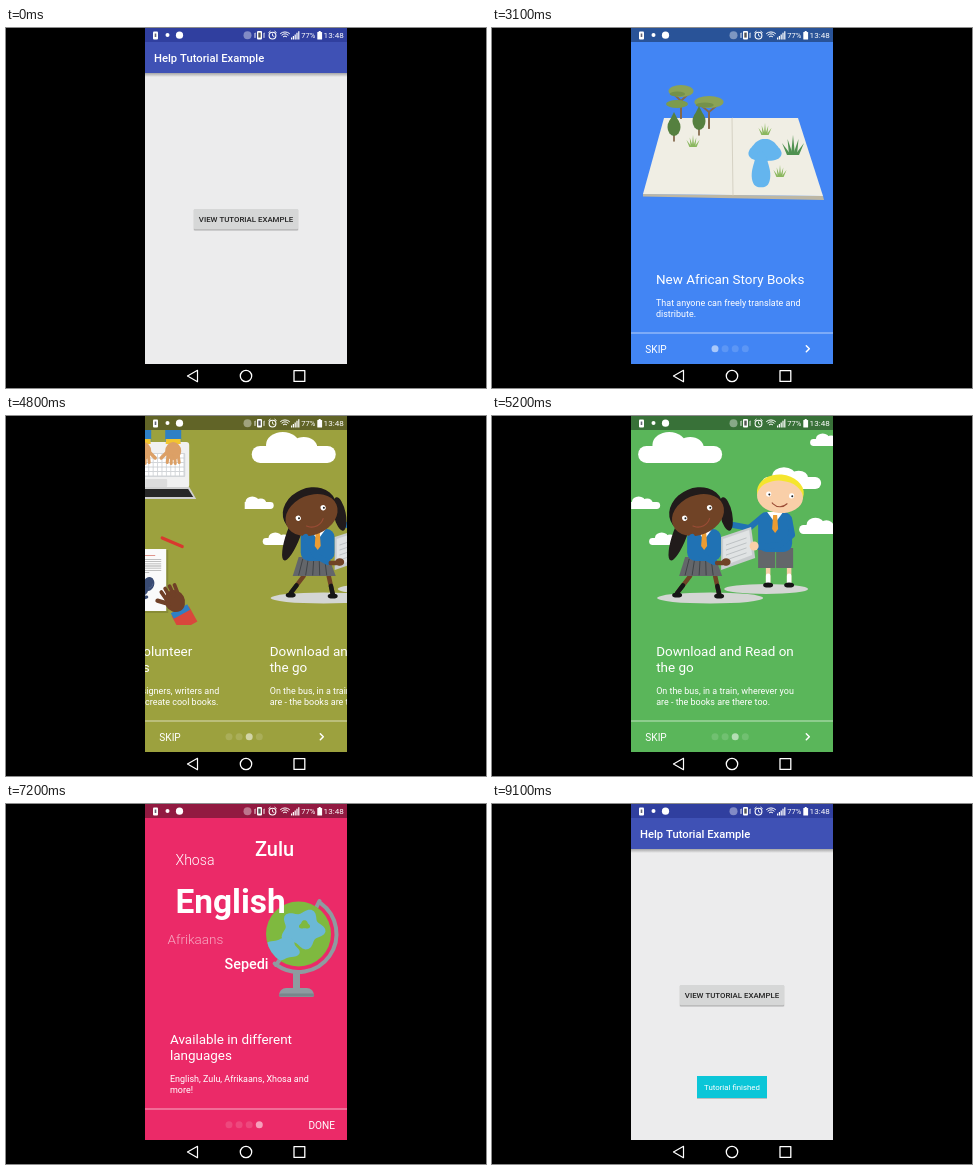
These frames come from a looping animation (480 by 360 pixels, 9.6 s). An HTML page with a canvas:

```html
<!DOCTYPE html>
<html lang="en">
<head>
<meta charset="utf-8">
<title>Help Tutorial Example</title>
<style>
html, body { margin: 0; width: 100%; height: 100%; overflow: hidden; background: #000; }
canvas { display: block; width: 480px; height: 360px; }
</style>
</head>
<body>
<canvas id="stage"></canvas>
<script>
const LOOP = 9600, STEP = 100;
const LEFT = 139, WIDTH = 202, BOTTOM = 336, RISE = 27, BAR = 14;
const OPEN = 2286, CLOSE = 7500, TOAST = 7800;
const SWIPES = [{ at: 3450, span: 590 }, { at: 4560, span: 680 }, { at: 5800, span: 860 }];

const scale = window.devicePixelRatio || 1;
const makeContext = canvas => {
  canvas.width = 480 * scale;
  canvas.height = 360 * scale;
  const c = canvas.getContext('2d');
  c.scale(scale, scale);
  return c;
};
const stage = makeContext(document.getElementById('stage'));
const layer = makeContext(document.createElement('canvas'));
let g = stage;

const clamp = v => Math.max(0, Math.min(1, v));
const mix = (a, b, k) => a + (b - a) * k;
const white = a => `rgba(255,255,255,${a})`;
const black = a => `rgba(0,0,0,${a})`;
const times = (n, fn) => { for (let i = 0; i < n; i++) fn(i); };

// Drawing helpers
function rect(color, x, y, w, h, r = 0) {
  g.fillStyle = color;
  g.beginPath();
  g.roundRect(x, y, w, h, r);
  g.fill();
}
function ell(color, x, y, rx, ry = rx, turn = 0) {
  g.fillStyle = color;
  g.beginPath();
  g.ellipse(x, y, rx, ry, turn, 0, Math.PI * 2);
  g.fill();
}
function trace(pts) {
  g.beginPath();
  for (let i = 0; i < pts.length; i += 2) g.lineTo(pts[i], pts[i + 1]);
}
function poly(color, ...pts) {
  trace(pts);
  g.fillStyle = color;
  g.fill();
}
function pen(color, w) {
  g.strokeStyle = color;
  g.lineWidth = w;
  g.lineCap = g.lineJoin = 'round';
  g.stroke();
}
function line(color, w, ...pts) {
  trace(pts);
  pen(color, w);
}
function arc(color, w, x, y, r, from = 0, to = Math.PI * 2) {
  g.beginPath();
  g.arc(x, y, r, from, to);
  pen(color, w);
}
// Ellipse with a wavy outline
function wobble(color, x, y, rx, ry, waves, amp, phase = 0) {
  const pts = [];
  times(48, i => {
    const a = i * Math.PI / 24, r = 1 + amp * Math.sin(waves * a + phase);
    pts.push(x + rx * r * Math.cos(a), y + ry * r * Math.sin(a));
  });
  poly(color, ...pts);
}
function text(str, x, y, size, weight = 400, color = '#fff', align = 'left') {
  g.font = `${weight} ${size}px Roboto, sans-serif`;
  g.textAlign = align;
  g.fillStyle = color;
  g.fillText(str, x, y);
}
function clipped(x, y, w, h, draw) {
  g.save();
  g.beginPath();
  g.rect(x, y, w, h);
  g.clip();
  draw();
  g.restore();
}
function placed(x, y, turn, sx, sy, draw) {
  g.save();
  g.translate(x, y);
  g.rotate(turn);
  g.scale(sx, sy);
  draw();
  g.restore();
}

// System bars
function statusIcons() {
  const w = '#fff';
  rect(w, 147, 3.5, 5, 8, 1);
  rect('#667', 148.7, 5.5, 1.6, 3.5);
  ell(w, 161.5, 7, 2);
  ell(w, 173.5, 7.2, 3.6);
  ell(white(.4), 241.5, 7.2, 4);
  rect(w, 251, 3, 5, 8.5, 1);
  rect('#555', 252.3, 4.6, 2.4, 5);
  for (const x of [249, 258]) line(w, .9, x, 5, x, 9.5);
  arc(w, 1.1, 266.5, 7.6, 3.4);
  line(w, .9, 266.5, 5.8, 266.5, 7.7, 268, 8.4);
  for (const d of [-1, 1]) line(w, 1, 266.5 + d * 3.8, 4.6, 266.5 + d * 2.3, 3.3);
  times(3, i => arc(w, 1, 279, 10.5, 2.5 + i * 2.1, -2.3, -.84));
  times(5, i => rect(w, 285 + i * 1.8, 9.6 - i * 1.6, 1.2, 1.8 + i * 1.6));
  text('77%', 295.3, 10.2, 7.6);
  rect(w, 311.3, 4, 4.8, 7.5, .6);
  rect(w, 312.7, 3, 2, 1.2);
  text('13:48', 317.6, 10.4, 8.1);
}
function navIcons() {
  line('#fff', 1.2, 181.5, 348, 191.5, 342.3, 191.5, 353.7, 181.5, 348);
  arc('#fff', 1.3, 240, 348, 5.7);
  g.strokeRect(288, 342.6, 10.8, 10.8);
}

function mainScreen(t) {
  rect('#ececed', LEFT, 0, WIDTH, BOTTOM);
  const shade = g.createLinearGradient(0, 45, 0, 49);
  shade.addColorStop(0, black(.3));
  shade.addColorStop(1, black(0));
  rect(shade, LEFT, 45, WIDTH, 4);
  rect('#3f51b5', LEFT, BAR, WIDTH, 31);
  rect('#303f9f', LEFT, 0, WIDTH, BAR);
  text('Help Tutorial Example', 148, 34, 11.22, 500);

  rect(black(.1), 187.5, 181, 105, 22, 1.5);
  rect(black(.16), 188, 182, 104, 20.3, 1);
  rect('#d6d7d7', 188, 181, 104, 20.3, 1);
  if (t >= 1400 && t < 2200) {
    const fade = .12 * clamp((2200 - t) / 400);
    clipped(188, 181, 104, 20.3, () => ell(black(fade), 240, 191, 60 * clamp((t - 1300) / 500)));
  }
  text('VIEW TUTORIAL EXAMPLE', 240, 194.2, 7.85, 500, '#212121', 'center');
}

// Story book landscape
function grass(x, y, s, color) {
  for (let i = -2; i <= 2; i++) {
    const root = x + i * s * .2;
    poly(color, root - s * .2, y, x + i * s * .55, y - s * (2 - Math.abs(i) * .4), root + s * .2, y);
  }
}
function acacia(x, y, w, base) {
  for (const d of [-1, 1]) line('#86694a', 1.8, x, base, x, y + 10, x + d * w * .3, y + 3);
  ell('#8aa356', x, y, w * .52, 6);
  ell('#74914a', x - w * .15, y + 3, w * .32, 2.5);
}
function bush(x, y) {
  line('#7a5c3e', 1.6, x, y + 16, x, y);
  ell('#55803f', x, y + 2, 6.5, 9);
  poly('#55803f', x - 5, y - 3, x, y - 13, x + 5, y - 3);
}
function drawMap() {
  poly('#bdb7a4', 151, 166, 331, 168, 332, 172, 151, 168.5);
  poly('#f0eee4', 172, 90, 306, 90, 331, 168, 151, 166);
  line('#d6d2c4', 1, 240, 90, 241, 167);
  wobble('#64b5ee', 273, 123, 16, 11, 3, .1);
  wobble('#64b5ee', 269, 143, 9, 18, 3, .1);
  acacia(217, 74, 28, 100);
  acacia(189, 63, 24, 90);
  ell('#7c9b4e', 185, 76, 11, 4);
  bush(182, 97);
  bush(207, 91);
  for (const [x, y] of [[201, 119], [273, 107], [288, 149]]) grass(x, y, 6, '#8ab75e');
  grass(301, 127, 10, '#4f9150');
}

// Desk seen from above
function cup(x, y) {
  ell('#fff', x, y, 9);
  ell('#ddd', x, y, 7.2);
  line('#fff', 2.4, x - 5, y + 1, x - 10, y);
  ell('#fff', x, y, 6.8);
  ell('#5a3522', x, y, 5.4);
}
// Fingers point up, thumb on the side of dir
function hand(x, y, turn, size, dir, skin, sleeve, cuff) {
  placed(x, y, turn, size * dir, size, () => {
    rect(sleeve, -8, 10, 16, 14);
    rect(cuff, -7.5, 8, 15, 5);
    ell(skin, 0, 1, 8, 9);
    times(4, i => line(skin, 3, i * 3.4 - 5, -3, i * 4 - 6, Math.abs(i - 1.5) - 12));
    line(skin, 3.4, 5, 1, 12, -6);
  });
}
function laptop() {
  rect('#f1f1f1', 226, 26, 67, 46, 3);
  rect('#d2d5d8', 230, 37, 59, 24, 1);
  times(65, i => rect('#fff', 231 + i % 13 * 4.4, 38 + Math.floor(i / 13) * 4.5, 3.5, 3.5, .5));
  rect('#dcdcdc', 249, 63, 22, 8, 1);
  poly('#d0d0d0', 226, 71, 293, 71, 300, 83, 219, 83);
  poly('#272727', 227, 73, 292, 73, 297, 81, 222, 81);
}
function elephant(x, y) {
  for (const d of [-1, 1]) {
    ell('#394b73', x + d * 5, y - 3, 5.5, 7, d * .3);
    arc('#53668f', .8, x + d * 5, y - 3, 4, 0, 2);
  }
  ell('#394b73', x, y, 5, 8);
  line('#394b73', 3, x, y + 4, x, y + 11, x + 3, y + 10);
}
function drawDesk() {
  g.translate(-7.5, 0);
  g.beginPath();
  g.moveTo(198, 30);
  g.bezierCurveTo(188, 52, 226, 30, 216, 48);
  g.bezierCurveTo(208, 50, 184, 52, 227, 68);
  pen('#eee', 1);
  ell('#fff', 197.4, 22, 6, 8.5, -.2);
  line('#bbb', .8, 196, 14, 197, 20);
  cup(197, 76);
  laptop();
  for (const d of [-1, 1]) hand(262 + d * 15, 36, Math.PI, 1, d, '#dca066', '#2f80c5', '#f2c52f');

  cup(211, 138);
  line('#d8392e', 3.2, 266, 122, 286, 130.5);
  rect(black(.13), 227, 134, 45, 63);
  rect('#fafafa', 226, 133, 44, 62);
  rect('#e0958c', 237, 139, 22, 1);
  times(7, i => rect('#aaa', 231, 143 + i * 2.2, i === 6 ? 22 : 34, .8));
  elephant(247.5, 171);
  clipped(LEFT, 0, WIDTH * 2, 209, () => {
    for (const d of [-1, 1]) hand(247 + d * 31, 184, -d * .5, 1.25, -d, '#704027', '#d9473c', '#2f7fc4');
  });
}

// School children
const BLUE = '#2072b4', BROWN = '#704326', PEACH = '#f9cfa8', GREY = '#63666a', HAIR = '#211b1b';
function cloud(x, y, w) {
  const h = w * .37;
  rect('#fff', x, y - h * .55, w, h * .55, h * .27);
  ell('#fff', x + w * .37, y - h * .58, w * .2, h * .42);
  ell('#fff', x + w * .62, y - h * .5, w * .16, h * .34);
}
function torso(x, y, w, h) {
  rect(BLUE, x - w / 2, y, w, h, w * .25);
  poly('#fff', x - 8, y, x + 8, y, x, y + 11);
  poly('#ec9c32', x - 2, y + 3, x + 2, y + 3, x + 3, y + 17, x, y + 21, x - 3, y + 17);
}
function head(x, y, rx, ry, tilt, skin, hair) {
  placed(x, y, tilt, 1, 1, () => {
    ell(hair, 0, -ry * .14, rx * 1.02, ry);
    ell(skin, 0, ry * .1, rx, ry * .9);
    for (const d of [-1, 1]) {
      ell('#fff', d * rx * .5, 0, 2.6);
      ell('#222', d * rx * .5 + .7, .3, 1);
    }
    arc('#9b4c35', 1.1, 0, ry * .1, ry * .55, .7, 2.4);
  });
}
function leg(x, y, foot, floor, skin, sock) {
  line(skin, 4.5, x, y, foot, floor);
  line(sock, 4.5, mix(x, foot, .55), mix(y, floor, .55), foot, floor);
  ell('#151515', foot, floor + 2, 5, 2.6);
}
function boy() {
  line(BLUE, 6, 269, 102, 257, 112, 241, 109);
  for (const x of [276, 297]) leg(x, 151, x, 167, PEACH, '#fff');
  rect(GREY, 266, 132, 17, 20);
  rect(GREY, 284, 132, 17, 20);
  torso(283, 96, 34, 40);
  line(BLUE, 6, 297, 103, 300, 119, 288, 129, 267, 131);
  head(288, 79, 23, 18, .08, PEACH, '#f5e52e');
}
function girl() {
  ell(HAIR, 188, 118, 7, 28, .35);
  ell(HAIR, 234, 98, 6, 17, -.2);
  leg(198, 160, 185, 177, BROWN, '#171717');
  leg(223, 160, 227, 178, BROWN, '#171717');
  poly(GREY, 193, 141, 223, 141, 230, 160, 187, 160);
  times(5, i => line('#3f4347', 1, 197 + i * 5.5, 143, 193 + i * 7, 159));
  torso(212, 113, 34, 32);
  head(205, 97, 27, 22, -.4, BROWN, HAIR);
}
function drawKids() {
  for (const [x, y, w] of [[146, 47, 84], [318, 30, 34], [270, 73, 59], [134, 93, 34], [307, 118, 44], [157, 129, 34]])
    cloud(x, y, w);
  ell('#d4d6d4', 274, 173, 42, 5);
  ell('#d4d6d4', 218, 182, 53, 5.5);
  boy();
  girl();
  poly('#c8ccce', 229, 121, 259, 111, 263, 142, 229, 154);
  poly('#e0e3e4', 231, 123, 257, 114, 260, 139, 231, 150);
  times(4, i => line('#b4b9bc', .8, 234, 129 + i * 5, 254, 122 + i * 5));
  line(BLUE, 6, 200, 121, 209, 139, 222, 146);
  line(BROWN, 4.5, 225, 147, 234, 147);
  ell(BROWN, 234, 146, 4.5, 3.8);
  ell(PEACH, 262, 130, 4.5);
}

// Globe and languages
function drawGlobe() {
  const metal = '#8e9ba0', x = 292.5, y = 130;
  rect(metal, 287, 166, 7, 20);
  rect(metal, 273, 184, 35, 9, [8, 8, 2, 2]);
  rect('#79868b', 273, 189.5, 35, 3, 1.5);
  arc(metal, 4, x, y, 38, -.95, 2.25);
  line(metal, 4, 313.5, 97, 310, 104);
  line(metal, 4, 270, 161, 275, 154);
  ell('#7fb93f', x, y, 32.5);
  g.save();
  g.beginPath();
  g.arc(x, y, 32.5, 0, Math.PI * 2);
  g.clip();
  wobble('#6bb8d6', x + 4, y - 5, 20, 18, 5, .16, 1);
  wobble('#6bb8d6', x - 16, y + 15, 16, 11, 4, .14);
  wobble('#7fb93f', x + 6, y - 9, 5, 4, 3, .2);
  g.restore();

  text('Zulu', 249, 52, 20, 500);
  text('Xhosa', 169.5, 61, 14.1, 300);
  text('English', 169.5, 108.5, 33.4, 700);
  text('Afrikaans', 161.5, 140, 13.5, 300, white(.6));
  text('Sepedi', 218.5, 164.5, 14.4, 500);
}

const SLIDES = [
  { draw: drawMap, color: [66, 133, 244], title: ['New African Story Books'],
    body: ['That anyone can freely translate and', 'distribute.'] },
  { draw: drawDesk, color: [224, 139, 34], title: ['Created by Volunteer', 'Professionals'],
    body: ['On a single day, designers, writers and', 'illustrators meet to create cool books.'] },
  { draw: drawKids, color: [90, 182, 90], title: ['Download and Read on', 'the go'],
    body: ['On the bus, in a train, wherever you', 'are - the books are there too.'] },
  { draw: drawGlobe, color: [235, 42, 104], title: ['Available in different', 'languages'],
    body: ['English, Zulu, Afrikaans, Xhosa and', 'more!'] }
];

function pageAt(t) {
  return SWIPES.reduce((sum, { at, span }) => {
    const u = clamp((t - at) / span);
    return sum + 1 - (1 - u ** 1.5) ** 3;
  }, 0);
}

function drawSlide(slide, dx) {
  g.save();
  g.translate(dx, 0);
  clipped(LEFT, BAR, WIDTH, BOTTOM - BAR, () => {
    const first = 256 - (slide.title.length - 1) * 15.8;
    slide.title.forEach((s, r) => text(s, 164, first + r * 15.8, 13.46));
    slide.body.forEach((s, r) => text(s, 164, 278.2 + r * 10.6, 8.98));
    slide.draw();
  });
  g.restore();
}

function tutorial(page) {
  const i = Math.min(2, Math.floor(page)), next = SLIDES[i + 1].color;
  const color = SLIDES[i].color.map((v, n) => Math.round(mix(v, next[n], page - i)));
  rect(`rgb(${color})`, LEFT, 0, WIDTH, BOTTOM);
  SLIDES.forEach((slide, n) => {
    if (Math.abs(n - page) < 1) drawSlide(slide, (n - page) * WIDTH);
  });

  const current = Math.round(page);
  rect(white(.62), LEFT, 304.5, WIDTH, 1);
  times(4, n => ell(white(n === current ? .55 : .14), 223 + n * 10.1, 320.7, 3.5));
  if (current < 3) {
    text('SKIP', 153.3, 324.6, 10.1);
    line('#fff', 1.5, 314.3, 317.8, 317.3, 320.8, 314.3, 323.8);
  } else {
    text('DONE', 302.5, 324.6, 10.1);
  }
}

function toast(alpha) {
  g.globalAlpha = alpha;
  rect(black(.2), 205, 273, 70, 22);
  rect('#0bc6d8', 205, 272, 70, 22);
  text('Tutorial finished', 240, 285.8, 7.85, 400, '#fff', 'center');
  g.globalAlpha = 1;
}

// Opacity and vertical shift of the tutorial window
function windowAt(t) {
  if (t < CLOSE) {
    const s = t - OPEN;
    return [1 - (1 - clamp(s / 200)) ** 4, RISE * (1 - clamp(s / 350)) ** 5];
  }
  const s = t - CLOSE;
  return [1 - clamp((s - 100) / 150), RISE * clamp(s / 250) ** 4];
}

function render(t) {
  g = stage;
  rect('#000', 0, 0, 480, 360);
  const [alpha, shift] = windowAt(t);
  if (alpha < 1) mainScreen(t);
  if (alpha > 0) {
    g = layer;
    g.clearRect(0, 0, 480, 360);
    clipped(LEFT, 0, WIDTH, BOTTOM, () => tutorial(pageAt(t)));
    g = stage;
    g.globalAlpha = alpha;
    g.drawImage(layer.canvas, 0, shift, 480, 360);
    rect(black(.38), LEFT, 0, WIDTH, BAR);
    g.globalAlpha = 1;
  }
  if (t >= TOAST) toast(clamp((t - TOAST + 100) / 300));
  statusIcons();
  navIcons();
}

const began = performance.now();
function tick() {
  const t = (performance.now() - began) % LOOP;
  render(Math.floor(t / STEP) * STEP);
  requestAnimationFrame(tick);
}
tick();
</script>
</body>
</html>
```
